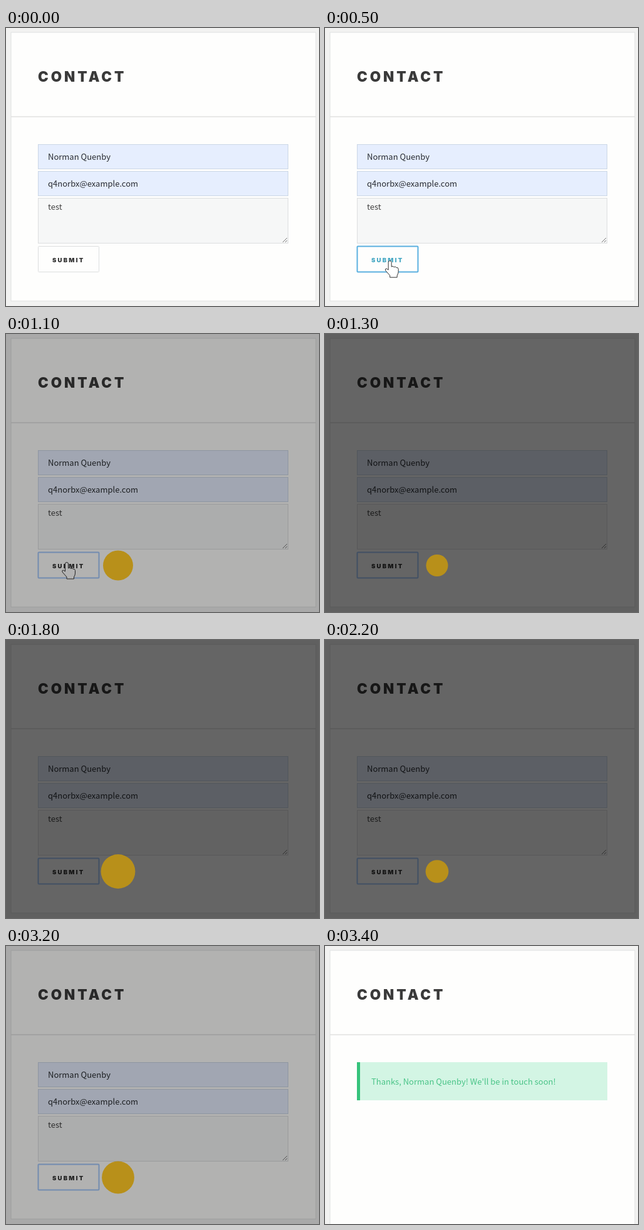
Animation, 500 px wide and 445 px high, one loop 6.8 s. Source, as an HTML page:

```html
<!DOCTYPE html>
<html lang="en">
<head>
<meta charset="utf-8">
<title>Contact form</title>
<style>
html, body { margin: 0; height: 100%; overflow: hidden; background: #f2f2f1; }
svg { display: block; width: 100%; height: 100%; }
text { font: 13px "Noto Sans CJK SC", "Noto Sans CJK JP", "Noto Sans CJK", "Open Sans", sans-serif; fill: #292c31; }
.head { font: 900 22.4px Inter, sans-serif; letter-spacing: 4px; fill: #3a3a3a; }
.label { font: 900 9.6px Inter, sans-serif; letter-spacing: 2.2px; }
.field { fill: #e6eefe; stroke: #cbd7e6; }
.area { fill: #f6f7f7; stroke: #dcdedf; }
</style>
</head>
<body>
<svg viewBox="0 0 500 445">
  <rect id="card" x="8" y="7" width="487" height="430" fill="#fefefd" stroke="#e0e1e1"/>
  <path d="M8 142H495" stroke="#e0e1e1" stroke-width="1.5"/>
  <text class="head" x="51" y="86">CONTACT</text>

  <g id="form">
    <rect class="field" x="51.5" y="186.5" width="399" height="39"/>
    <rect class="field" x="51.5" y="229.5" width="399" height="39"/>
    <rect class="area" x="51.5" y="272.5" width="399" height="72"/>
    <path d="M442 343l7-7M446 343l3-3" stroke="#777"/>
    <text x="67" y="211">Norman Quenby</text>
    <text x="67" y="254">q4norbx@example.com</text>
    <text x="67" y="291" style="fill:#444">test</text>
    <rect id="button" x="51.5" y="349.5" width="97" height="41" rx="1" fill="#fefefd"/>
    <text id="label" class="label" x="74" y="374.5">SUBMIT</text>
  </g>

  <g id="thanks">
    <rect x="51" y="186" width="400" height="61" fill="#d3f5e4"/>
    <rect x="51" y="186" width="5" height="61" fill="#36c37c"/>
    <text x="74" y="222" style="fill:#4ac488">Thanks, Norman Quenby! We'll be in touch soon!</text>
  </g>

  <path id="hand" fill="#fff" stroke="#333" stroke-linejoin="round"
    d="M-2.5 14V2a2.5 2.5 0 0 1 5 0V9q2-2 4 .5q2.5-1.5 4 1q2.5-1 3 2V17q0 3-2 6v3H0V23L-7 15q-1-3 1.5-3z"/>
  <rect id="shade" width="500" height="445"/>
  <circle id="spinner" cx="179" cy="370.5" fill="#b8901a"/>
</svg>
<script>
const LOOP = 6800, STEP = 100;
const el = id => document.getElementById(id);
const set = (id, attrs) => {
  for (const name in attrs) el(id).setAttribute(name, attrs[name]);
};
const show = (id, on) => set(id, { visibility: on ? "visible" : "hidden" });
const ramp = (t, from, to) => Math.min(1, Math.max(0, (t - from) / (to - from)));
const swing = p => (1 - Math.cos(Math.PI * p)) / 2;

function draw(now) {
  const t = Math.floor(now % LOOP / STEP) * STEP;
  const done = t >= 3400;
  const hover = t >= 500 && t < 1000;
  const focused = t >= 1000;

  show("form", !done);
  show("thanks", done);
  set("card", { height: done ? 460 : 430 });
  set("button", {
    stroke: hover ? "#5ab0e0" : focused ? "#a4c8fc" : "#dcdedf",
    "stroke-width": hover || focused ? 2 : 1
  });
  el("label").style.fill = hover ? "#48a9c4" : "#333";

  const away = 1 - swing(ramp(t, 100, 600));
  show("hand", t >= 200 && t < 1200);
  set("hand", { transform: `translate(${97 + 70 * away} ${366 + 75 * away})` });

  const fade = swing(ramp(t, 900, 1300)) - swing(ramp(t, 3000, 3400));
  const pulse = 54.5 - 13 * Math.cos(2 * Math.PI * (t - 1325) / 800);
  set("shade", { opacity: 0.6 * fade });
  set("spinner", { r: pulse * 0.42, opacity: Math.min(1, fade * 2.2) });
}

let start;
function tick(now) {
  start ??= now;
  draw(now - start);
  requestAnimationFrame(tick);
}
requestAnimationFrame(tick);
</script>
</body>
</html>
```
